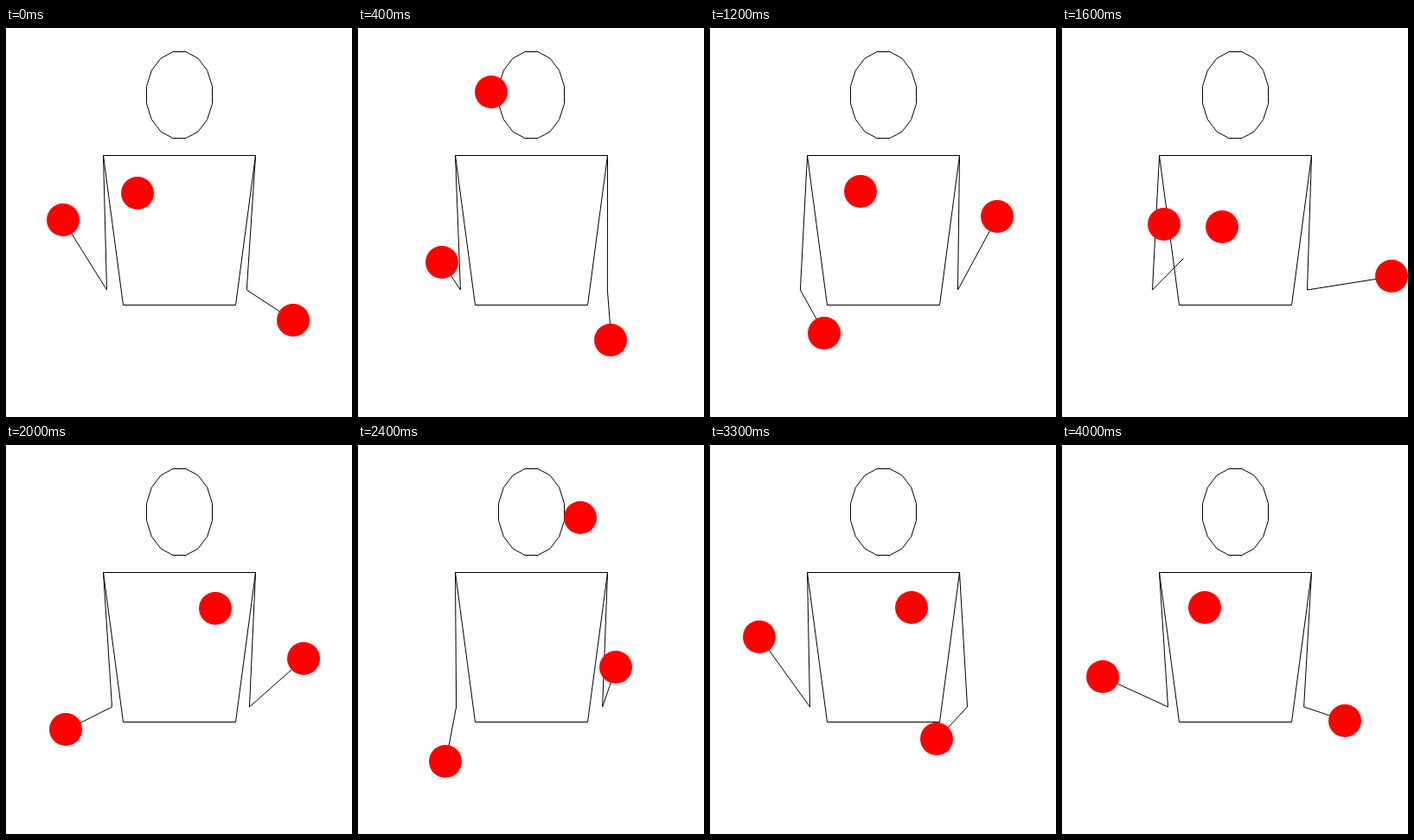
Recreate the animation shown at these times as an HTML page. Size 400 by 450 pixels, loop 4100 ms.

```html
<!DOCTYPE html>
<html lang="en">
<head>
<meta charset="utf-8">
<title>Three-ball juggler</title>
<style>
  html, body { margin: 0; width: 100%; height: 100%; overflow: hidden; background: #fff; }
  svg { display: block; }
  .lines { fill: none; stroke: #000; stroke-width: 1; }
  .balls { fill: #f00; }
</style>
</head>
<body>
<svg width="400" height="450" viewBox="0 0 400 450">
  <g class="lines" transform="translate(.5 .5)">
    <polygon id="head"/>
    <polygon points="112,147 288,147 265,320 135,320"/>
    <polyline class="arm"/>
    <polyline class="arm"/>
  </g>
  <g class="balls">
    <circle r="19"/>
    <circle r="19"/>
    <circle r="19"/>
  </g>
</svg>
<script>
// Time is counted in steps. The right side does what the left does, mirrored, half a loop later.
const STEP = 100, LOOP = 41, HALF = LOOP / 2, WIDTH = 400;

// Left-hand throws: release (from), catch by the right hand (to), top of the arc,
// and the points [step, x, y] the hand passes while carrying and then reaching.
const low = (peak, carry, reach) => ({
  from: peak - 5.15, to: peak + 4.55, peak, x: 234.5, y: 188, speed: 14, fall: 3.4, carry, reach
});
const high = {
  from: 0, to: 11.5, peak: 5.87, x: 195.7, y: 57, speed: 22.1, fall: 4.8,
  carry: [[-8, 57, 222], [-4.5, 19, 287], [-1, 47, 268]],
  reach: [[1.75, 90, 200]]
};
const throws = [
  high,
  low(19.5, [[9, 100, 389], [12.5, 138, 340]], [[16, 140, 266]]),
  low(33.1, [[20.5, 68, 338], [24, 101, 366]], [[29.5, 143, 236]])
];
const elbowTurns = [
  [0, 116], [3.8, 118], [9, 113], [12.5, 103], [16, 104], [20, 122],
  [24.3, 112.5], [29.5, 106], [33, 115], [36.5, 117], [40, 122]
];

const wrap = t => ((t % LOOP) + LOOP) % LOOP;
const mirror = ([x, y]) => [WIDTH - x, y];

const flight = (th, t) => {
  const d = t - th.peak;
  return [th.x + th.speed * d, th.y + th.fall * d * d];
};
const thrown = (th, t) => [t, ...flight(th, t)];
const incoming = (th, t) => [t, ...mirror(flight(th, t + HALF))];

// Smooth curve through unevenly timed keys; the outer two only set the end slopes.
function spline(keys, t) {
  let i = 1;
  while (i < keys.length - 3 && keys[i + 1][0] <= t) i++;
  const [a, b, c, d] = keys.slice(i - 1, i + 3);
  const h = c[0] - b[0], u = (t - b[0]) / h;
  const slope = (p, q, r, k) => {
    const h1 = q[0] - p[0], h2 = r[0] - q[0];
    return ((q[k] - p[k]) / h1 * h2 + (r[k] - q[k]) / h2 * h1) / (h1 + h2);
  };
  return b.slice(1).map((start, n) => {
    const k = n + 1, m = slope(a, b, c, k) * h, w = slope(b, c, d, k) * h, rise = c[k] - start;
    return start + u * (m + u * (3 * rise - 2 * m - w + u * (m + w - 2 * rise)));
  });
}

const later = th => ({ ...th, from: th.from + LOOP, to: th.to + LOOP, peak: th.peak + LOOP });

// Each throw gives two hand moves: catch to release, then release to the next catch.
const moves = throws.flatMap((th, i) => {
  const next = throws[i + 1] || later(high);
  const grab = th.to - HALF, nextGrab = next.to - HALF;
  return [
    { end: th.from, keys: [incoming(th, grab - 1), incoming(th, grab), ...th.carry,
                           thrown(th, th.from), thrown(th, th.from + 1)] },
    { end: nextGrab, keys: [thrown(th, th.from - 1), thrown(th, th.from), ...th.reach,
                            incoming(next, nextGrab), incoming(next, nextGrab + 1)] }
  ];
});
const firstGrab = high.to - HALF;

function handAt(t) {
  const s = wrap(t - firstGrab) + firstGrab;
  return spline(moves.find(m => s < m.end).keys, s);
}

const elbowKeys = [-1, 0, 1].flatMap(n => elbowTurns.map(([s, x]) => [s + n * LOOP, x]));
const armAt = t => [[112, 147], [...spline(elbowKeys, wrap(t)), 302.5], handAt(t)];

function ballAt(th, t) {
  const s = wrap(t - th.from), own = th.from + s % HALF;
  const p = own < th.to ? flight(th, own) : mirror(handAt(own + HALF));
  return s < HALF ? p : mirror(p);
}

const SIDES = 16;
const head = Array.from({ length: SIDES }, (_, i) => {
  const a = (i + 0.5) * 2 * Math.PI / SIDES, r = 1 / Math.cos(Math.PI / SIDES);
  return [200 + 38 * r * Math.cos(a), 77 + 50 * r * Math.sin(a)];
});
document.getElementById('head').setAttribute('points', head.join(' '));

const arms = document.querySelectorAll('.arm');
const circles = document.querySelectorAll('circle');

function draw(t) {
  arms[0].setAttribute('points', armAt(t).join(' '));
  arms[1].setAttribute('points', armAt(t + HALF).map(mirror).join(' '));
  throws.forEach((th, i) => {
    const [x, y] = ballAt(th, t).map(Math.round);
    circles[i].setAttribute('cx', x);
    circles[i].setAttribute('cy', y);
  });
}

const start = performance.now();
function tick() {
  draw(Math.floor((performance.now() - start) / STEP) % LOOP);
  requestAnimationFrame(tick);
}
tick();
</script>
</body>
</html>
```
